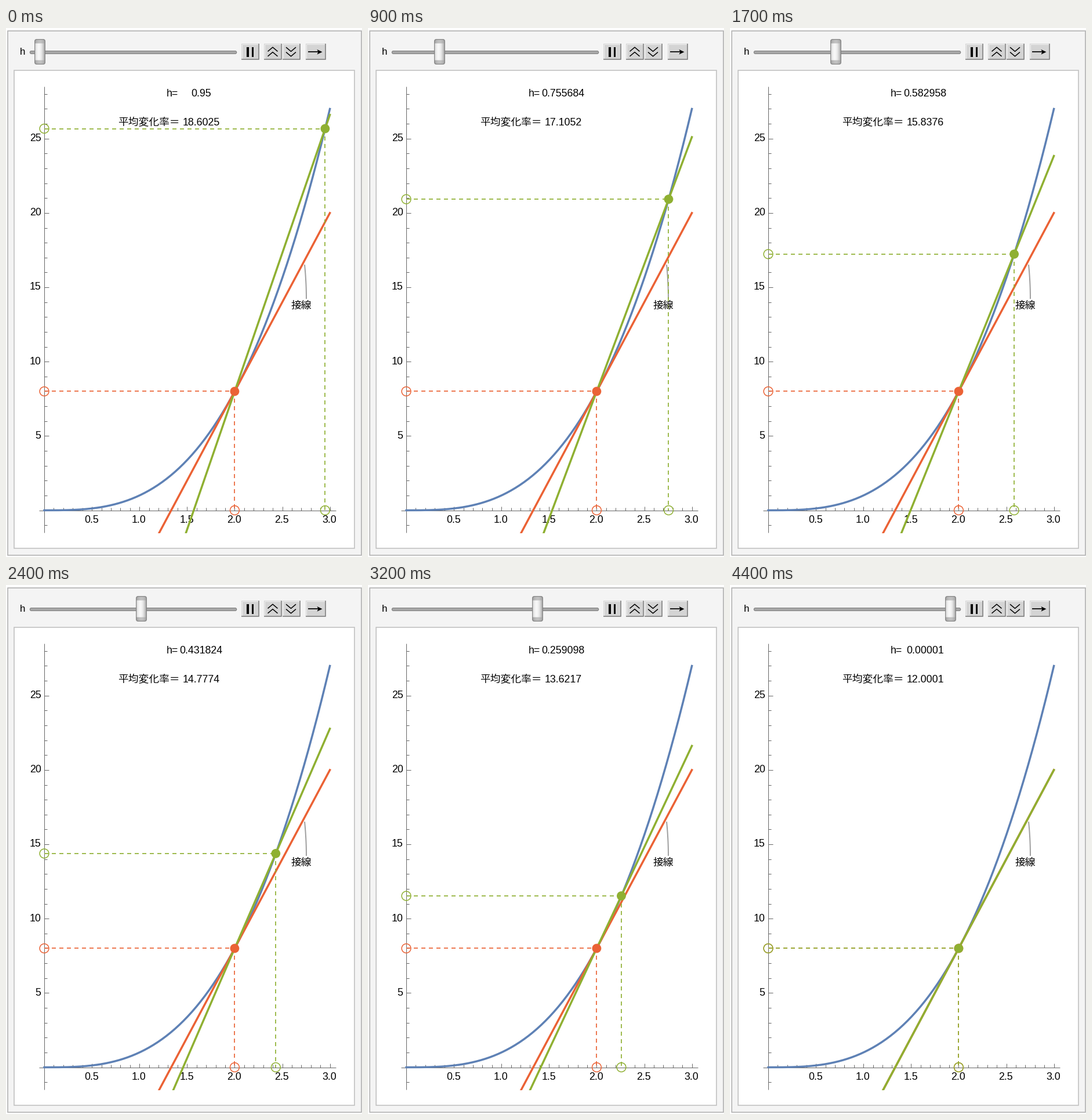
Recreate the animation shown at these times as a matplotlib script. Size 614 by 912 pixels, loop 4500 ms.

```python
import numpy as np
import matplotlib.pyplot as plt
from matplotlib.animation import FuncAnimation
from matplotlib.patches import Circle, FancyBboxPatch, Polygon, Rectangle

W, H, DPI = 614, 912, 64
PT = 72 / DPI  # points per pixel
FRAMES, STEP_MS = 45, 100
H_START, H_END = 0.95, 0.00001

X0, Y0 = 66, 831.5
SX, SY = 164.2, 25.63
BOTTOM = 870.5
BLUE, RED, GREEN = "#5e81b5", "#eb6235", "#8fb032"
AXIS = "#666666"
SANS, CJK = "Liberation Sans", "Noto Sans CJK JP"

fig = plt.figure(figsize=(W / DPI, H / DPI), dpi=DPI, facecolor="white")
ax = fig.add_axes([0, 0, 1, 1])
ax.axis("off")


def px(x):
    return X0 + SX * x


def py(y):
    return Y0 - SY * y


def line(xs, ys, color, width, z, **kw):
    kw.setdefault("solid_capstyle", "butt")
    return ax.plot(xs, ys, color=color, lw=width * PT, zorder=z, **kw)[0]


def label(x, y, text, ha="center", size=17.8, font=SANS, z=6):
    return ax.text(x, y, text, ha=ha, va="baseline", fontsize=size * PT,
                   family=font, color="black", zorder=z)


def box(x0, y0, x1, y1, fill, edge="none", width=0, z=0):
    ax.add_patch(Rectangle((x0, y0), x1 - x0, y1 - y0, facecolor=fill,
                           edgecolor=edge, lw=width * PT, zorder=z))


def dot(color, z, filled=False):
    face = color if filled else "none"
    return ax.add_patch(Circle((0, 0), 7.9, facecolor=face, edgecolor=color,
                               lw=(0 if filled else 1.5) * PT, zorder=z))


class Marker:
    """Point on the curve with dashed guides to both axes."""

    def __init__(self, color, z):
        dash = dict(dashes=(7 / 1.7, 6 / 1.7), dash_capstyle="butt")
        self.across = line([], [], color, 1.7, z, **dash)
        self.down = line([], [], color, 1.7, z, **dash)
        self.rings = dot(color, z), dot(color, z)
        self.point = dot(color, z + 0.5, filled=True)

    def move(self, x):
        u, v = px(x), py(x ** 3)
        self.across.set_data([X0, u], [v, v])
        self.down.set_data([u, u], [v, Y0])
        self.rings[0].center = X0, v
        self.rings[1].center = u, Y0
        self.point.center = u, v


def draw_panel():
    box(2.5, 4.5, 613, 909, "#f4f4f4", "#b0b0b0", 1.6)
    box(13.5, 72.5, 601, 896.5, "white", "#c0c0c0", 1.6)
    label(23.5, 45.5, "h", ha="left", size=17)
    ax.add_patch(FancyBboxPatch((42.5, 40.8), 354, 2.4, zorder=1,
                                boxstyle="round,pad=1.2,rounding_size=2.4",
                                facecolor="#a8a8a8", edgecolor="#808080",
                                lw=1.1 * PT))


def draw_button(x0, x1):
    y0, y1 = 27, 55
    box(x0, y0, x1, y1, "#d4d4d4", z=1)
    line([x0 + .5, x0 + .5, x1], [y1, y0 + .5, y0 + .5], "#f0f0f0", 1, 2)
    line([x0, x1 - .7, x1 - .7], [y1 - .7, y1 - .7, y0], "#7c7c7c", 1.5, 2)


def draw_buttons():
    for x0, x1 in ((406, 437), (445, 476), (477, 508), (517, 551.5)):
        draw_button(x0, x1)
    for x in (415, 423.5):
        box(x, 33, x + 3.5, 49.5, "black", z=3)
    for cx, tip in ((460, -1), (491.5, 1)):
        for cy in (36.8, 45.2):
            line([cx - 8.5, cx, cx + 8.5],
                 [cy - 3.6 * tip, cy + 3.6 * tip, cy - 3.6 * tip],
                 "black", 1.5, 3)
    line([521, 541], [41.3, 41.3], "black", 1.7, 3)
    ax.add_patch(Polygon([(545.5, 41.3), (536.5, 37), (538.5, 41.3),
                          (536.5, 45.6)], color="black", lw=0, zorder=3))


def thumb_image(w=19, h=44, k=4):
    """Rounded metallic slider handle with darker caps."""
    y, x = np.mgrid[0:h * k, 0:w * k] / k + 0.5 / k
    dx, dy = np.abs(x - w / 2), np.abs(y - h / 2)
    r = 4
    qx, qy = dx - w / 2 + r, dy - h / 2 + r
    edge = (np.hypot(np.maximum(qx, 0), np.maximum(qy, 0))
            + np.minimum(np.maximum(qx, qy), 0) - r)
    u = (x - w / 2) / (w / 2)
    body = 0.97 - 0.28 * np.abs(u + 0.2) ** 2
    cap = 0.6 + 0.16 * (1 - u ** 2)
    shade = np.where(dy < 14.5, body, cap)
    shade = np.where(edge > -1.3, 0.48, shade)
    alpha = np.clip(0.5 - edge, 0, 1)
    return np.dstack([shade, shade, shade, alpha])


def draw_axes():
    line([57, 569], [Y0, Y0], AXIS, 1, 1)
    line([X0, X0], [101, 870], AXIS, 1, 1)
    for i in range(1, 31):
        major = i % 5 == 0
        u = px(i / 10)
        line([u, u], [Y0, Y0 - (7 if major else 4.5)], AXIS, 1, 1)
        if major:
            label(u - 0.7, 853, f"{i / 10:.1f}", z=2)
    for i in range(-1, 29):
        major = i % 5 == 0
        v = py(i)
        line([X0, X0 + (8 if major else 4.5)], [v, v], AXIS, 1, 1)
        if major and i:
            label(60.5, v + 4.3, str(i), ha="right", z=2)


def plot_line(color, z):
    ln = line([], [], color, 3.5, z, solid_capstyle="projecting")
    ln.set_clip_path(Rectangle((0, 0), W, BOTTOM, transform=ax.transData))
    return ln


def set_chord(ln, slope):
    x = np.array([2 - 10 / slope, 3])
    ln.set_data(px(x), py(8 + slope * (x - 2)))


draw_panel()
draw_buttons()
thumb = ax.imshow(thumb_image(), extent=(0, 19, 63, 19), aspect="auto",
                  zorder=4)
ax.set_xlim(0, W)
ax.set_ylim(H, 0)
ax.set_autoscale_on(False)
draw_axes()

curve, tangent, secant = (plot_line(c, 3 + i / 10)
                          for i, c in enumerate((BLUE, RED, GREEN)))
xs = np.linspace(0, 3, 200)
curve.set_data(px(xs), py(xs ** 3))
set_chord(tangent, 12)

t = np.linspace(0, 1, 20)
line(515 + 3 * (1 - (1 - t) ** 2), 408 + 59 * t, "#a0a0a0", 2, 3.5)
label(509, 483.5, "接線", font=CJK)
label(287, 118, "h=")
label(246, 168.5, "平均変化率＝", font=CJK)
h_text = label(336.3, 118, "")
rate_text = label(336.5, 168.5, "")

fixed, moving = Marker(RED, 4), Marker(GREEN, 5)
fixed.move(2)


def update(i):
    s = i / (FRAMES - 1)
    h = H_START + (H_END - H_START) * s
    rate = 12 + 6 * h + h * h
    moving.move(2 + h)
    set_chord(secant, rate)
    h_text.set_text("0.00001" if i == FRAMES - 1 else f"{h:.6g}")
    rate_text.set_text(f"{rate:.6g}")
    cx = 58 + 322.3 * s
    thumb.set_extent((cx - 9.5, cx + 9.5, 63, 19))
    return []


anim = FuncAnimation(fig, update, frames=FRAMES, interval=STEP_MS,
                     init_func=lambda: update(0), repeat=True,
                     repeat_delay=0, blit=False)
plt.show()
```
